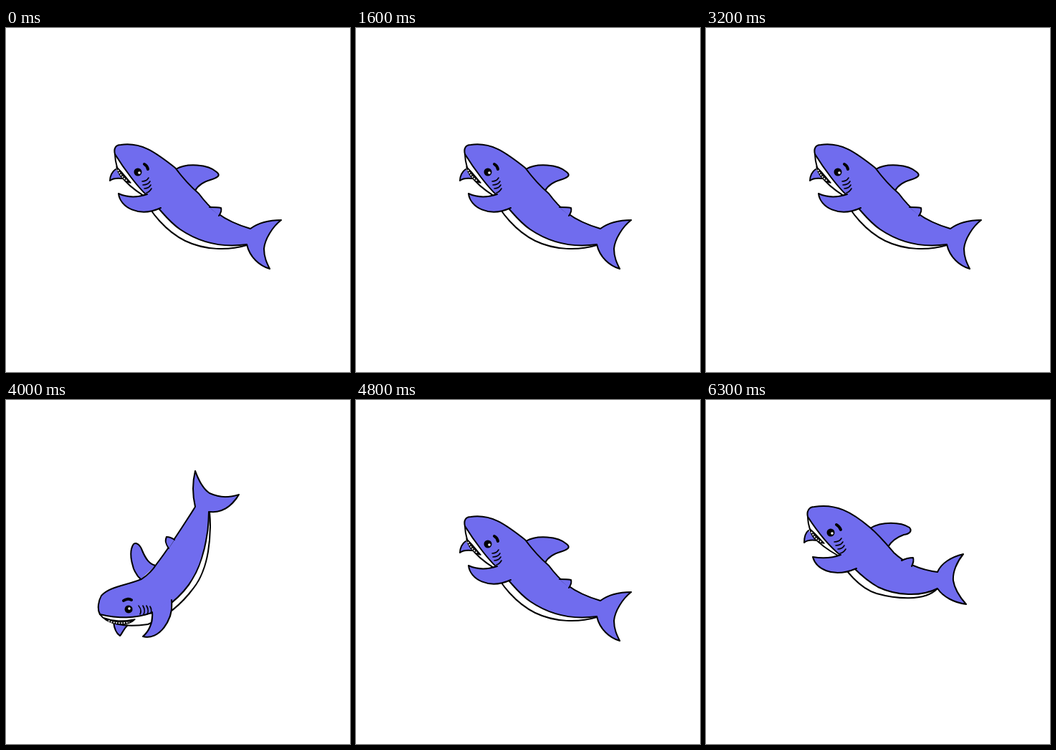
These frames come from a looping animation (480x480 px, 6400 ms). An HTML page without scripts:

```html
<!DOCTYPE html>
<html lang="en">
<head>
<meta charset="utf-8">
<title>Swimming shark</title>
<style>
html, body { margin: 0; width: 100%; height: 100%; overflow: hidden; background: #fff; }
svg { display: block; width: 100vw; height: 100vh; }

path {
  fill: none; stroke: #000; stroke-width: 2;
  stroke-linecap: round; stroke-linejoin: round;
  animation: 1.6s steps(8) infinite;
}
.skin { fill: #706cee; }
.belly { fill: #fff; animation-name: belly; }
.far { animation-name: far; }
.dorsal { animation-name: dorsal; }
.small { animation-name: small; }
.body { animation-name: body; }
.near { animation-name: near; }
.mouth { fill: #111; stroke-width: 1.4; animation-name: mouth; }
.teeth { stroke: #fff; stroke-width: 1.8; stroke-linecap: butt; stroke-dasharray: 1.8 1.8; animation-name: teeth; }
.gills { stroke-width: 1.6; animation-name: gills; }
.eye { stroke-width: 11; animation-name: eye; }
.glint { stroke: #fff; stroke-width: 3.6; animation-name: glint; }
.brow { stroke-width: 4; animation-name: brow; }

/* Rotation and drift, held for a tenth of a second each */
.swim { transform-origin: 265px 250px; animation: swim 1.6s step-end infinite; }
@keyframes swim {
  0%, 100% { transform: translate(0, 0) rotate(0deg); }
  6.25% { transform: translate(1px, 3px) rotate(-9deg); }
  12.5% { transform: translate(-3px, 4px) rotate(-20deg); }
  18.75% { transform: translate(-10px, 3px) rotate(-33deg); }
  25% { transform: translate(-16px, 0) rotate(-47deg); }
  31.25% { transform: translate(-24px, -5px) rotate(-60deg); }
  37.5% { transform: translate(-30px, -13px) rotate(-71deg); }
  43.75% { transform: translate(-40px, -23px) rotate(-81deg); }
  50% { transform: translate(-50px, -35px) rotate(-90deg); }
  56.25% { transform: translate(-60px, -46px) rotate(-92deg); }
  62.5% { transform: translate(-67px, -58px) rotate(-90deg); }
  68.75% { transform: translate(-66px, -70px) rotate(-82deg); }
  75% { transform: translate(-50px, -80px) rotate(-66deg); }
  81.25% { transform: translate(-30px, -74px) rotate(-42deg); }
  87.5% { transform: translate(-15px, -46px) rotate(-18deg); }
  93.75% { transform: translate(-11px, -15px) rotate(0deg); }
}

/* Bending: the dive at 50%, the tail flick at 93.75% */
@keyframes far {
  50% { d: path("M170,185 C162,186 154,189 151,194 C154,197 160,199 165,204"); animation-timing-function: steps(7); }
  93.75% { d: path("M154,197 C150,200 148,207 148,214 C152,210 160,210 167,211"); animation-timing-function: step-end; }
}
@keyframes belly {
  50% { d: path("M181,166 C168,175 162,200 167,233 C178,260 195,280 218,297 C245,318 290,322 324,319"); animation-timing-function: steps(7); }
  93.75% { d: path("M153,179 C154,201 163,214 195,232 C204,253 226,278 249,285 C274,292 316,297 334,278"); animation-timing-function: step-end; }
}
@keyframes dorsal {
  50% { d: path("M230,223 C240,211 268,205 279,213 C282,217 278,222 270,225 C258,230 251,235 249,244"); animation-timing-function: steps(7); }
  93.75% { d: path("M240,194 C256,184 283,185 295,193 C299,198 295,202 287,203 C276,207 269,213 265,220"); animation-timing-function: step-end; }
}
@keyframes small {
  50% { d: path("M273,262 C280,257 284,257 289,259 C289,263 288,266 285,270"); animation-timing-function: steps(7); }
  93.75% { d: path("M284,239 C290,236 296,235 300,235 C301,238 300,243 298,247"); animation-timing-function: step-end; }
}
@keyframes body {
  50% { d: path("M183,238 C175,215 175,190 181,166 C189,162 200,164 207,168 C220,180 221,202 230,224 C236,233 243,240 251,245 C277,265 298,278 331,299 C348,295 365,295 381,299 C370,303 356,310 350,319 C343,335 344,347 348,360 C330,349 322,335 324,318 C290,318 252,309 230,295 C216,287 207,278 197,266"); animation-timing-function: steps(7); }
  93.75% { d: path("M199,232 C184,220 166,198 153,178 C151,170 155,164 162,164 C192,159 214,171 240,193 C253,204 262,215 273,228 C289,243 311,252 334,255 C339,243 353,234 370,230 C361,241 355,255 356,267 C358,280 366,291 374,300 C358,298 342,290 334,278 C311,290 276,288 251,276 C239,269 228,260 219,251"); animation-timing-function: step-end; }
}
@keyframes near {
  50% { d: path("M184,239 C170,240 158,235 150,226 C144,248 172,269 201,266"); animation-timing-function: steps(7); }
  93.75% { d: path("M199,231 C186,236 172,236 160,234 C164,249 186,265 221,250"); animation-timing-function: step-end; }
}
@keyframes mouth {
  50% { d: path("M176,172 C171,185 171,201 174,215 C165,207 164,187 176,172"); animation-timing-function: steps(7); }
  93.75% { d: path("M156,195 C162,199 168,207 176,215 C168,215 159,209 156,195"); animation-timing-function: step-end; }
}
@keyframes teeth {
  50% { d: path("M172,178 C168,187 168,198 170,207"); animation-timing-function: steps(7); }
  93.75% { d: path("M158,199 C162,207 167,211 172,213"); animation-timing-function: step-end; }
}
@keyframes gills {
  50% { d: path("M193,220 Q187,225 181,222 M193,226 Q187,230 181,227 M193,231 Q187,235 181,232 M192,236 Q187,239 182,237"); animation-timing-function: steps(7); }
  93.75% { d: path("M200,208 Q197,213 190,213 M202,213 Q199,218 192,218 M204,218 Q201,223 195,223 M206,223 Q203,228 198,229"); animation-timing-function: step-end; }
}
@keyframes eye {
  50% { d: path("M188,206 h0"); animation-timing-function: steps(7); }
  93.75% { d: path("M185,200 h0"); animation-timing-function: step-end; }
}
@keyframes glint {
  50% { d: path("M189,207 h0"); animation-timing-function: steps(7); }
  93.75% { d: path("M187,201 h0"); animation-timing-function: step-end; }
}
@keyframes brow {
  50% { d: path("M200,199 Q204,205 201,210"); animation-timing-function: steps(7); }
  93.75% { d: path("M193,189 Q197,191 199,196"); animation-timing-function: step-end; }
}
</style>
</head>
<body>
<svg viewBox="0 0 480 480">
  <g class="swim">
    <path class="skin far" d="M153,197 C148,200 145,207 145,213 C150,209 158,209 168,211"/>
    <path class="belly" d="M152,176 C153,200 162,215 192,234 C200,257 224,284 250,297 C277,310 310,311 336,303"/>
    <path class="skin dorsal" d="M237,197 C252,188 282,190 294,201 C299,205 297,208 288,211 C277,214 268,219 264,227"/>
    <path class="skin body" d="M196,233 C184,222 165,197 152,176 C150,168 153,163 160,163 C188,159 207,172 236,195 C245,207 256,220 269,231 C284,251 300,268 341,280 C352,272 366,268 384,268 C372,277 361,295 360,308 C360,320 364,328 368,336 C354,332 340,320 336,302 C300,307 268,298 243,281 C231,273 222,262 214,253"/>
    <path class="skin small" d="M284,250 C289,250 295,250 300,251 C301,254 300,258 297,262"/>
    <path class="skin near" d="M197,232 C182,237 168,236 157,231 C159,250 185,265 216,251"/>
    <path class="mouth" d="M154,194 C161,199 166,207 174,216 C166,215 158,208 154,194"/>
    <path class="teeth" d="M156,198 C160,206 165,211 170,214"/>
    <path class="gills" d="M199,209 Q196,214 190,214 M201,214 Q198,219 191,219 M202,219 Q199,224 193,224 M203,224 Q200,229 196,230"/>
    <path class="eye" d="M184,201 h0"/>
    <path class="glint" d="M186,202 h0"/>
    <path class="brow" d="M193,190 Q197,192 198,197"/>
  </g>
</svg>
</body>
</html>
```
